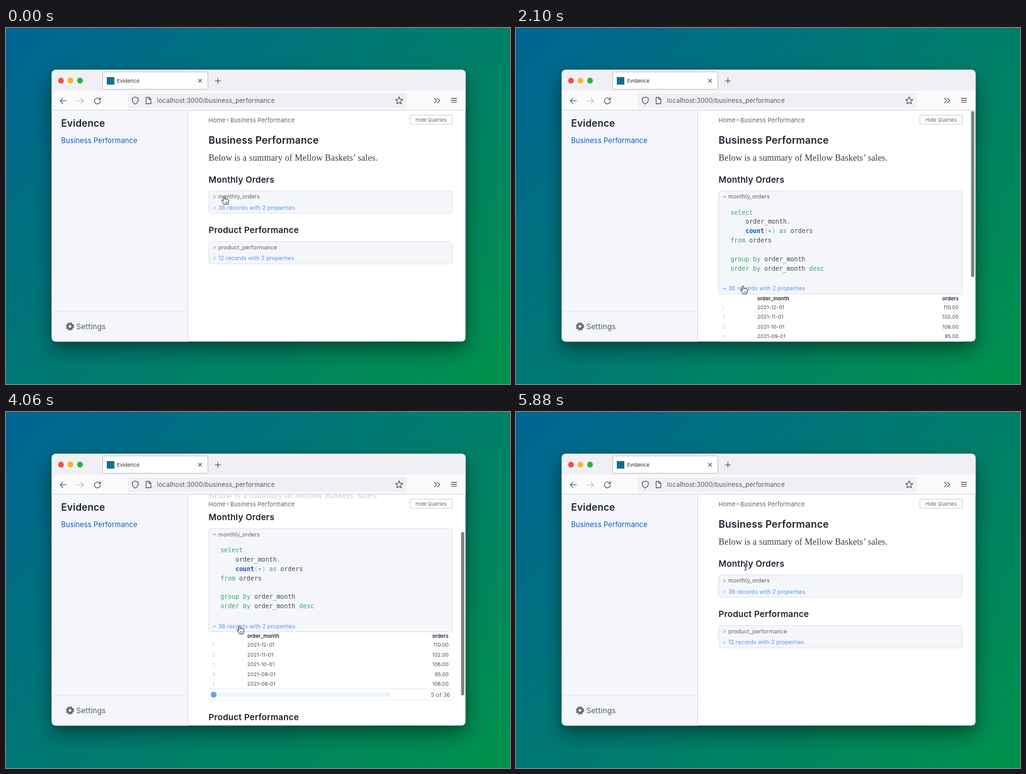
These frames come from a looping animation (800 by 566 pixels, 5950 ms). An HTML page:

```html
<!DOCTYPE html>
<html lang="en">
<head>
<meta charset="utf-8">
<title>Business Performance</title>
<style>
html, body { margin: 0; width: 100%; height: 100%; overflow: hidden; }
body { background: linear-gradient(135deg, #006494, #00914a); }
#shadow { position: absolute; left: 73px; top: 67px; width: 656px; height: 431px; border-radius: 6px;
  box-shadow: 0 13px 30px rgba(0, 0, 0, .42), 0 2px 8px rgba(0, 0, 0, .16); }
svg { position: absolute; left: 0; top: 0; }
text { font-family: Inter, sans-serif; letter-spacing: .013em; white-space: pre; }
.serif { font-family: "Liberation Serif", serif; letter-spacing: .15px; }
.code { font-family: "DejaVu Sans Mono", monospace; letter-spacing: 0; }
.kw { fill: #36a876; }
.fn { fill: #0d52cf; font-weight: 700; }
.dim { fill: #a3a8ad; }
.icon { fill: none; stroke: #4c4c52; stroke-width: 1.1; stroke-linecap: round; stroke-linejoin: round; }
</style>
</head>
<body>
<div id="shadow"></div>
<svg id="stage" width="800" height="566" viewBox="0 0 800 566"></svg>
<script>
const LOOP = 5950, STEP = 70;
const CODE_H = 128.5, TABLE_H = 108.5;
const INK = '#1b222d', GREY = '#5c6168', LINK = '#5795ee';

// y is the optical middle of the line
const text = (x, y, size, str, fill = INK, extra = '') =>
  `<text x="${x}" y="${y + size * .36}" font-size="${size}" fill="${fill}" ${extra}>${str}</text>`;
const bold = 'font-weight="600"';
const rect = (x, y, w, h, fill, extra = '') =>
  `<rect x="${x}" y="${y}" width="${w}" height="${h}" fill="${fill}" ${extra}/>`;
const line = (y, x1, x2, color) => rect(x1, y, x2 - x1, 1, color);
const icon = (d, extra = '') => `<path class="icon" d="${d}" ${extra}/>`;
const dot = (x, y, r, fill) => `<circle cx="${x}" cy="${y}" r="${r}" fill="${fill}"/>`;
const chevron = (id, x, y, color) =>
  `<g transform="translate(${x} ${y})"><path id="${id}" d="M-1.2-2.2L1 0L-1.2 2.2" fill="none" stroke="${color}"/></g>`;

function chrome() {
  return rect(72, 66, 658, 35, '#f0f0f4') + rect(72, 100, 658, 31, '#fbfbfd') +
    dot(87.3, 83.7, 4.6, '#f4504d') + dot(102.4, 83.7, 4.6, '#f9b42d') + dot(117.5, 83.7, 4.6, '#22b93c') +
    rect(153.5, 69.8, 167, 27.6, '#fff', 'rx="3" stroke="#bdbdc6"') +
    rect(160, 78, 12, 12, '#146f92') +
    text(176, 84.3, 8.1, 'Evidence', '#2a2a30') +
    icon('M305.6 81.4l4.8 4.8m0-4.8l-4.8 4.8', 'stroke-width=".9"') +
    icon('M332 84h8.6m-4.3-4.3v8.6') +
    icon('M96 115.7H86.2m4-4.1l-4 4.1 4 4.1') +
    icon('M113.2 115.7h9.8m-4-4.1l4 4.1-4 4.1', 'style="stroke:#b9b9bf"') +
    icon('M148.6 112.7A4.7 4.7 0 1 0 149.9 116M150 110.6v3h-3') +
    rect(193, 103.5, 443, 23.5, '#f0f0f4', 'rx="2.5"') +
    icon('M205.2 109.8l4.8 1.6v3.2c0 3-2 5-4.8 6.3c-2.8-1.3-4.8-3.3-4.8-6.3v-3.2z') +
    icon('M222.4 110.4h4.6l3 3v7h-7.6zM227 110.4v3h3') +
    text(239.8, 115.7, 10, 'localhost:3000/business_performance', '#55555c') +
    icon('M624 109.6l1.7 3.7 4 .5-3 2.7.8 4-3.5-2-3.5 2 .8-4-3-2.7 4-.5z', 'stroke-width=".9"') +
    icon('M680 111.5l3.7 3.8-3.7 3.8m4.7-7.6l3.7 3.8-3.7 3.8') +
    icon('M706.8 111.9h8.4m-8.4 3.2h8.4m-8.4 3.2h8.4', 'stroke-width=".9"') +
    line(130, 72, 730, '#d5d5da');
}

function sidebar() {
  return rect(72, 131, 216.5, 368, '#f4f6fb') + rect(288, 131, 1, 368, '#d9dce2') +
    text(87.6, 151, 15.3, 'Evidence', INK, bold) +
    text(87.6, 179, 11.1, 'Business Performance', '#0c57c2') +
    line(450, 73, 288, '#e3e6ec') +
    `<g fill="none" stroke="#646a73"><circle cx="101.5" cy="474.5" r="3.8" stroke-width="3"/>
     <circle cx="101.5" cy="474.5" r="5.5" stroke-width="2.4" stroke-dasharray="2.35 1.97"/></g>` +
    text(111.5, 475, 11.9, 'Settings', '#565c65');
}

function code() {
  const span = (cls, s) => `<tspan class="${cls}">${s}</tspan>`;
  const kw = s => span('kw', s), dim = s => span('dim', s);
  const lines = [
    [0, kw('select')],
    [4, 'order_month' + dim(',')],
    [4, span('fn', 'count') + dim('(') + kw('∗') + dim(')') + kw(' as') + ' orders'],
    [0, kw('from') + ' orders'],
    [0, ''],
    [0, kw('group by') + ' order_month'],
    [0, kw('order by') + ' order_month ' + kw('desc')]
  ];
  return lines.map(([col, s], i) =>
    text(340.4 + col * 5.96, 293 + i * 14.85, 9.9, s, '#444a52', 'class="code"')).join('');
}

// drawn below the fully opened query box
function table() {
  const end = 'text-anchor="end"';
  const rows = [['12', 110], ['11', 102], ['10', 106], ['09', 95], ['08', 106]];
  return text(383, 430, 8, 'order_month', INK, bold) +
    text(702.6, 430, 8, 'orders', INK, bold + ' ' + end) +
    rows.map(([month, n], i) => {
      const y = 444 + i * 15.5;
      return text(327.5, y, 7, i + 1, '#c3c6ca') +
        text(383, y, 8, `2021-${month}-01`, '#41464e') +
        text(702.6, y, 8, n.toFixed(2), '#41464e', end) +
        line(y + 7.3, 322, 709, i < 4 ? '#f7f8f9' : '#e4e6ea');
    }).join('') +
    rect(325, 519.4, 285, 7, '#eaf4fd', 'rx="3.5"') + dot(329.6, 522.9, 4.6, '#64a3e8') +
    text(705, 523, 8.8, '5 of 36', GREY, end) + line(531, 322, 709, '#e4e6ea');
}

const box = 'stroke="#e1e4eb"';
function page() {
  return text(321.6, 178.3, 15.65, 'Business Performance', INK, bold) +
    text(321.6, 205.6, 14, 'Below is a summary of Mellow Baskets’ sales.', '#343941', 'class="serif"') +
    text(321.6, 240.7, 13.55, 'Monthly Orders', INK, bold) +
    `<path id="queryBox" fill="#f4f6fa" ${box}/>` +
    chevron('queryMark', 331, 268.4, GREY) + text(337, 268, 8.9, 'monthly_orders', GREY) +
    `<g clip-path="url(#codeClip)">${code()}</g>
     <g id="results">${chevron('resultMark', 331, 285.9, LINK)}${text(337, 285.5, 8.9, '36 records with 2 properties', LINK)}</g>
     <g id="tableShift"><g clip-path="url(#tableClip)">${table()}</g></g>
     <g id="product">` +
    text(321.6, 321.4, 13.55, 'Product Performance', INK, bold) +
    rect(321.7, 339.5, 387, 35.5, '#f4f6fa', box + ' rx="3.5"') +
    chevron('m1', 331, 349.2, GREY) + text(337, 348.8, 8.9, 'product_performance', GREY) +
    chevron('m2', 331, 366.4, LINK) + text(337, 366, 8.9, '12 records with 2 properties', LINK) + '</g>';
}

function header() {
  return rect(289, 131, 432, 30.5, 'url(#fade)') +
    text(321.6, 146.3, 9.4, 'Home', GREY) + text(350, 146, 9.4, '›', GREY) +
    text(356, 146.3, 9.4, 'Business Performance', GREY) +
    rect(641, 138.5, 67.5, 14.5, '#fff', 'rx="2" stroke="#cdd0d5"') +
    text(674.7, 146, 7.85, 'Hide Queries', GREY, 'text-anchor="middle"');
}

const beam = 'M-2.5-5.5Q0-5.5 0-4Q0-5.5 2.5-5.5M0-4V4M-2.5 5.5Q0 5.5 0 4Q0 5.5 2.5 5.5M-1.3 1.5H1.3';
const stage = document.getElementById('stage');
stage.innerHTML = `<defs>
  <linearGradient id="fade" x2="0" y2="1"><stop offset="0" stop-color="#fff" stop-opacity=".75"/>
    <stop offset=".75" stop-color="#fff" stop-opacity=".74"/><stop offset="1" stop-color="#fff" stop-opacity=".5"/></linearGradient>
  <clipPath id="frame"><rect x="72.6" y="66.6" width="656.8" height="431.8" rx="6"/></clipPath>
  <clipPath id="view"><rect x="289" y="131" width="441" height="368"/></clipPath>
  <clipPath id="codeClip"><rect id="codeRect" x="322" y="276" width="387" height="0"/></clipPath>
  <clipPath id="tableClip"><rect id="tableRect" x="321" y="423.5" width="389" height="0"/></clipPath>
</defs>
<g clip-path="url(#frame)">${rect(72, 66, 658, 433, '#fff')}${chrome()}${sidebar()}
  <g clip-path="url(#view)"><g id="page">${page()}</g>${header()}
    <rect id="thumb" x="722.4" width="5" rx="2.5" fill="#7e7f83"/></g>
</g>
<g id="hand"><path d="M-3 1V-5.2a1.25 1.25 0 0 1 2.5 0V-1.6c.2-1 2-.9 2.2.1c.4-.8 1.8-.5 2 .4c.5-.6 1.7-.2 1.7.8V2.3c0 1.6-.9 2-1 4H-2.2C-2.5 4.6-4.4 2.7-5.4.8c-.6-1.2.9-2 1.7-1z"
  fill="#fff" stroke="#25272b" stroke-width=".95" stroke-linejoin="round"/><path d="M-.1 2v2.6M1.5 2v2.6M3.1 2v2.6" stroke="#25272b" stroke-width=".6"/></g>
<g id="beam" fill="none"><path d="${beam}" stroke="#fff" stroke-width="2.2"/><path d="${beam}" stroke="#25272b" stroke-width=".9"/></g>`;

const $ = Object.fromEntries([...stage.querySelectorAll('[id]')].map(el => [el.id, el]));
const set = (el, attrs) => { for (const k in attrs) el.setAttribute(k, attrs[k]); };
const shift = (el, x, y) => el.setAttribute('transform', `translate(${x} ${y})`);

const easeOut = p => 1 - (1 - p) ** 3;
const easeBoth = p => p * p * (3 - 2 * p);

// keys: [time, value, ...]
function track(keys, t, ease) {
  const i = keys.findIndex(k => k[0] > t);
  if (i === 0) return keys[0].slice(1);
  if (i < 0) return keys[keys.length - 1].slice(1);
  const a = keys[i - 1], b = keys[i], p = ease((t - a[0]) / (b[0] - a[0]));
  return a.slice(1).map((v, n) => v + (b[n + 1] - v) * p);
}

const QUERY = [[0, 0], [450, 0], [850, 1], [5200, 1], [5600, 0]];
const TABLE = [[0, 0], [1850, 0], [2250, 1], [4150, 1], [4550, 0]];
const SCROLL = [[0, 0], [2900, 0], [3290, 49.5], [3640, 73.5]];
const CURSOR = [[0, 348, 274], [850, 348, 274], [1450, 362, 416.5], [2100, 362, 416.5], [2500, 359, 419],
  [3550, 359, 419], [3990, 372.5, 346.5], [4480, 372.5, 346.5], [5000, 367.7, 251.6], [5500, 367.7, 251.6], [5800, 364.5, 246]];

function draw(t) {
  const [q] = track(QUERY, t, easeOut), [r] = track(TABLE, t, easeOut);
  const codeH = CODE_H * q, tableH = TABLE_H * r;
  const max = Math.max(0, 22 - CODE_H + codeH + tableH);
  const scroll = Math.min(track(SCROLL, t, easeOut)[0], max);
  const [x, y] = track(CURSOR, t, easeBoth);

  const bottom = 294.5 + codeH, c = r > 0 ? 0 : 3.5;
  set($.queryBox, { d: `M325.2 259H705.2q3.5 0 3.5 3.5V${bottom - c}q0 ${c} ${-c} ${c}H${321.7 + c}q${-c} 0 ${-c} ${-c}V262.5q0-3.5 3.5-3.5z` });
  set($.codeRect, { height: codeH });
  set($.tableRect, { height: tableH });
  set($.queryMark, { transform: `rotate(${90 * q})` });
  set($.resultMark, { transform: `rotate(${90 * r})` });
  shift($.results, 0, codeH);
  shift($.tableShift, 0, codeH - CODE_H);
  shift($.product, 0, codeH + tableH);
  shift($.page, 0, -scroll);

  const thumbH = 357.5 - .75 * max;
  set($.thumb, {
    y: 132 + (max ? scroll / max * (364 - thumbH) : 0),
    height: thumbH,
    visibility: max > 0 ? 'visible' : 'hidden'
  });

  const overText = t >= 5460;
  set($.hand, { visibility: overText ? 'hidden' : 'visible' });
  set($.beam, { visibility: overText ? 'visible' : 'hidden' });
  shift($.hand, x, y);
  shift($.beam, x, y);
}

const start = performance.now();
function tick() {
  const t = (performance.now() - start) % LOOP;
  draw(Math.floor(t / STEP) * STEP);
  requestAnimationFrame(tick);
}
tick();
</script>
</body>
</html>
```
